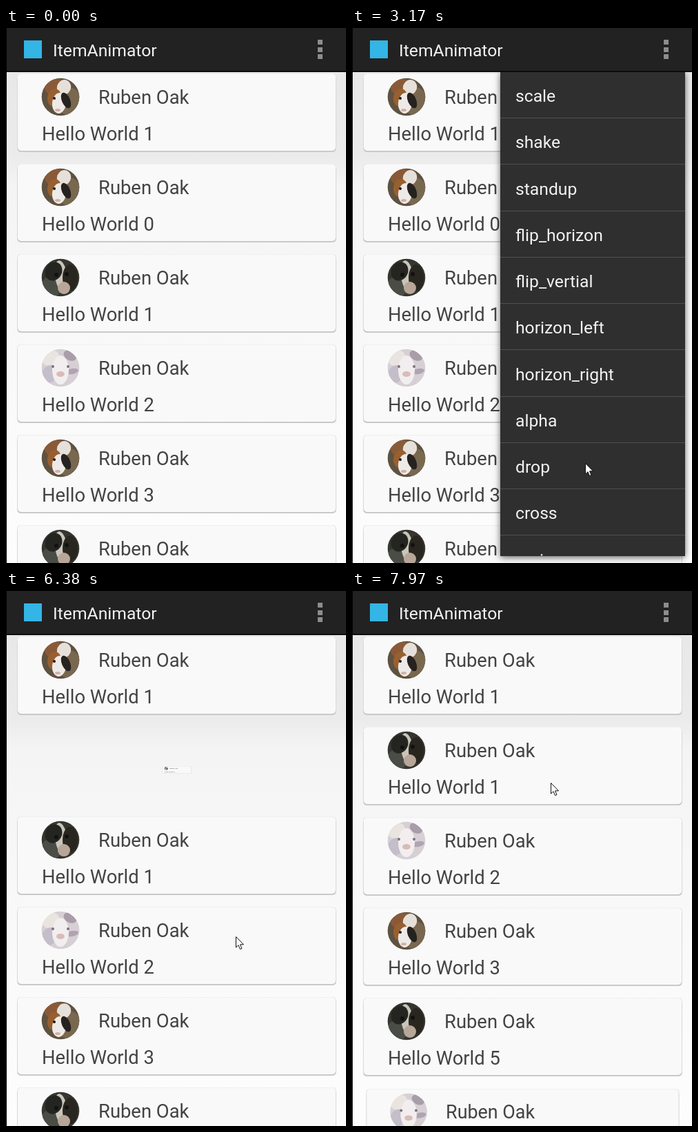
Animation of 493 by 776 pixels, one loop 8 s. Source, as an HTML page with a canvas:

```html
<!DOCTYPE html>
<html lang="en">
<head>
<meta charset="utf-8">
<title>ItemAnimator</title>
<style>
  html, body { margin: 0; width: 100%; height: 100%; overflow: hidden; background: #fff; }
  canvas { display: block; }
</style>
</head>
<body>
<canvas id="stage" width="493" height="776"></canvas>
<script>
const ctx = document.getElementById('stage').getContext('2d');
const W = 493, H = 776, LOOP = 8000, PITCH = 131, PIVOT_X = 247.5, PIVOT_Y = 63;
const NAME = 'Ruben Oak';
const MENU = ['scale', 'shake', 'standup', 'flip_horizon', 'flip_vertial', 'horizon_left',
  'horizon_right', 'alpha', 'drop', 'cross', 'spring'];

// Pointer path: time, x, y of the tip
const POINTER = [
  [600, 480, -18], [1050, 455, 30], [1280, 455, 30], [1450, 438, 78], [1810, 378, 241],
  [2340, 353, 597], [2520, 338, 631], [3170, 338, 631], [3780, 296, 112], [4040, 296, 112],
  [4770, 250, 389], [4860, 249, 391], [5140, 249, 391], [5800, 333, 501], [6500, 333, 501],
  [6990, 318, 516], [7120, 317, 514], [7880, 288, 281], [7970, 288, 278]
];

const ramp = (t, start, length) => Math.min(1, Math.max(0, (t - start) / length));
const ease = (t, start, length) => (1 - Math.cos(Math.PI * ramp(t, start, length))) / 2;

function rect(x, y, w, h, color) {
  ctx.fillStyle = color;
  ctx.fillRect(x, y, w, h);
}

function label(text, x, y, size, color) {
  ctx.font = `${size}px Roboto, sans-serif`;
  ctx.fillStyle = color;
  ctx.fillText(text, x, y);
}

function blob(x, y, rx, ry, angle, color) {
  ctx.fillStyle = color;
  ctx.beginPath();
  ctx.ellipse(x, y, rx, ry, angle, 0, 7);
  ctx.fill();
}

// Each portrait is drawn around its own centre, radius 27
const PORTRAITS = {
  brown() {
    blob(0, 0, 28, 28, 0, '#5f5240');
    blob(12, 6, 17, 20, 0.2, '#786850');
    blob(-4, -13, 19, 13, 0.1, '#8a5a38');
    blob(5, -14, 10, 11, 0.4, '#e6e0da');
    blob(-9, 1, 10, 13, 0.2, '#98602f');
    blob(-2, 9, 10, 15, 0.1, '#eeeae7');
    blob(8, 5, 6, 12, -0.4, '#25221f');
    blob(-9, 2, 2, 2, 0, '#1c1714');
    blob(-4, 19, 4, 2, 0, '#d5b0a6');
  },
  dark() {
    blob(0, 0, 28, 28, 0, '#34362f');
    blob(-13, 13, 15, 15, 0, '#4a4d45');
    blob(1, -2, 9, 23, -0.15, '#c9c5bb');
    blob(-10, -9, 12, 14, 0.5, '#242520');
    blob(14, 0, 11, 19, 0, '#292620');
    blob(5, 15, 9, 9, 0, '#b8a698');
    blob(-6, -4, 3, 3, 0, '#11120f');
    blob(9, -5, 3, 3, 0, '#11120f');
  },
  light() {
    blob(0, 0, 28, 28, 0, '#d6d0d5');
    blob(-14, -14, 13, 10, -0.6, '#e9e4df');
    blob(14, -18, 10, 7, 0.5, '#a99da9');
    blob(-16, 9, 11, 13, 0.4, '#c4bdca');
    blob(17, 5, 9, 4, -0.2, '#b1a4b2');
    blob(0, 3, 12, 21, 0, '#f2eeef');
    blob(0, 9, 6, 4, 0, '#d8bcb8');
    blob(-11, -2, 2, 2, 0, '#7b7277');
    blob(11, -2, 2, 2, 0, '#7b7277');
  }
};

function portrait(kind, x, y) {
  ctx.save();
  ctx.translate(x, y);
  ctx.beginPath();
  ctx.arc(0, 0, 27.3, 0, 7);
  ctx.clip();
  PORTRAITS[kind]();
  ctx.restore();
}

function card(top, kind, number, scale = 1) {
  if (scale <= 0 || top > H) return;
  ctx.save();
  ctx.translate(PIVOT_X, top + PIVOT_Y);
  ctx.scale(scale, scale);
  ctx.translate(-PIVOT_X, -PIVOT_Y);
  const layers = [[16, 0, 463, 114, '#e7e7e7'], [16.5, 3, 462, 111, '#c9c9c9'], [17, 0.5, 461, 111.5, '#f9f9f9']];
  for (const [x, y, w, h, color] of layers) {
    ctx.fillStyle = color;
    ctx.beginPath();
    ctx.roundRect(x, y, w, h, 5);
    ctx.fill();
  }
  portrait(kind, 79, 34);
  label(NAME, 134, 44, 27.4, '#434343');
  label('Hello World ' + number, 52, 97, 27.4, '#434343');
  ctx.restore();
}

function background() {
  const shade = ctx.createLinearGradient(0, 64, 0, H);
  [[0, '#e8e8e8'], [0.17, '#ebebeb'], [0.23, '#f4f4f4'], [0.6, '#f9f9f9'], [1, '#fdfdfd']]
    .forEach(stop => shade.addColorStop(...stop));
  rect(0, 0, W, H, shade);
}

function cards(t) {
  const top = 197 - PITCH * ease(t, 6339, 744);
  card(66, 'brown', 1);
  card(197, 'brown', 0, 1 - ease(t, 5800, 720));
  card(top + PITCH, 'dark', 1);
  card(top + 2 * PITCH, 'light', 2);
  card(top + 3 * PITCH, 'brown', 3);
  card(top + 4 * PITCH, 'dark', 5);
  card(197 + 4 * PITCH, 'light', 6, ease(t, 7180, 865));
}

function header() {
  rect(0, 0, W, 64, '#222');
  rect(0, 62, W, 2, '#0c0c0c');
  rect(26, 18, 26, 26, '#33b5e5');
  label('ItemAnimator', 68, 41, 24.7, '#f3f3f3');
  for (const y of [17, 28, 38]) rect(452, y, 7, 7, '#8d8d8d');
}

function menu(t) {
  const shown = ramp(t, 1230, 150) * (1 - ramp(t, 3890, 140));
  if (!shown) return;
  const scale = 0.94 + 0.06 * shown;
  ctx.save();
  ctx.beginPath();
  ctx.rect(0, 63, W, H);
  ctx.clip();
  ctx.globalAlpha = shown;
  ctx.translate(349, 64);
  ctx.scale(scale, scale);
  ctx.translate(-349, -64);
  ctx.shadowColor = 'rgba(0,0,0,.6)';
  ctx.shadowBlur = 9;
  ctx.shadowOffsetY = 2;
  rect(215, 64, 268, 702, '#2f2f2f');
  ctx.shadowColor = 'transparent';
  ctx.beginPath();
  ctx.rect(215, 64, 268, 702);
  ctx.clip();
  if (t > 3740) rect(215, 64, 268, 67, '#34809c');
  MENU.forEach((text, i) => {
    const y = 64 + 67.25 * i;
    label(text, 237, y + 43, 24.7, '#f3f3f3');
    rect(215, Math.round(y + 66), 268, 1, '#505050');
  });
  ctx.globalAlpha = shown * (1 - ramp(t, 1900, 350));
  rect(474, 69, 4, 656, '#5c5c5c');
  ctx.restore();
}

function pointer(t) {
  if (t < POINTER[0][0]) return;
  const found = POINTER.findIndex(key => key[0] > t);
  const next = found < 0 ? POINTER.length - 1 : found;
  const [t0, x0, y0] = POINTER[next - 1], [t1, x1, y1] = POINTER[next];
  const p = ramp(t, t0, t1 - t0);
  ctx.save();
  ctx.translate(x0 + (x1 - x0) * p, y0 + (y1 - y0) * p);
  ctx.fillStyle = '#fff';
  ctx.strokeStyle = '#111';
  ctx.lineWidth = 1;
  ctx.stroke(ctx.fill(arrow) || arrow);
  ctx.restore();
}
const arrow = new Path2D('M.5 .5V16L4 12.7L6.5 18.5L9 17.5L6.5 11.8H11.5Z');

function draw(now) {
  const t = now % LOOP;
  background();
  cards(t);
  header();
  menu(t);
  rect(0, 0, 1, H, '#000');
  pointer(t);
}

let start;
function tick(now) {
  start ??= now;
  draw(now - start);
  requestAnimationFrame(tick);
}
draw(0);
requestAnimationFrame(tick);
</script>
</body>
</html>
```
